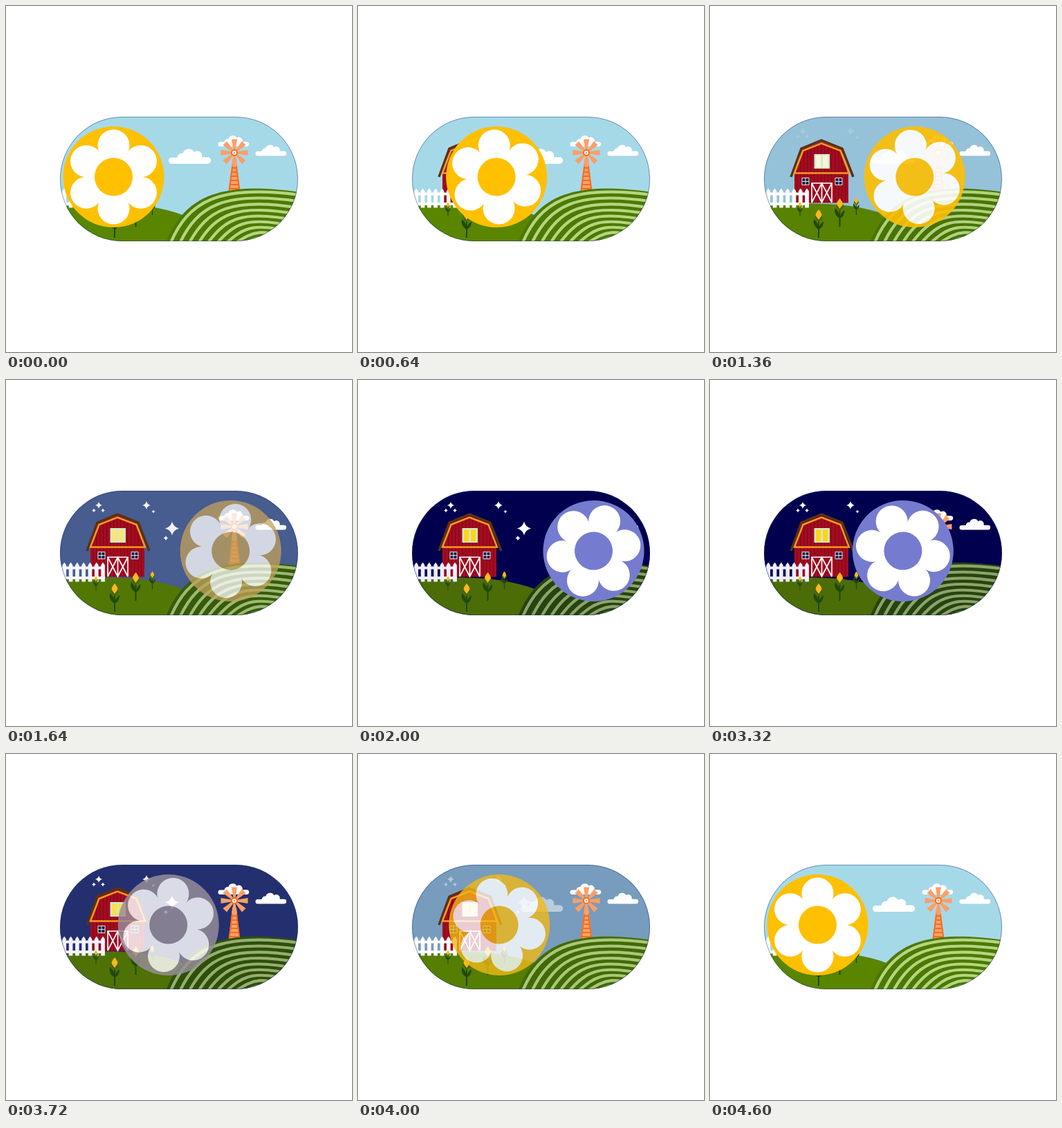
Animation of 500x500 px, one loop 4.96 s. Source, as an HTML page:

```html
<!DOCTYPE html>
<html lang="en">
<head>
<meta charset="utf-8">
<title>Day and night switch</title>
<style>
html, body { margin: 0; width: 100%; height: 100%; overflow: hidden; background: #fff; }
svg { display: block; width: 100vw; height: 100vh; }
</style>
</head>
<body>
<svg viewBox="0 0 500 500">
  <defs>
    <clipPath id="pill"><rect x="78" y="160" width="344" height="180" rx="90"/></clipPath>
    <pattern id="planks" width="5" height="10" patternUnits="userSpaceOnUse">
      <rect width="5" height="10" fill="#a80a20"/>
      <rect width="1.4" height="10" fill="#7d0c1c"/>
    </pattern>
    <path id="cloud" fill="#fff" d="M4.5 22a4.5 4.5 0 0 1 0-9h8a6.5 6.5 0 0 1 8-6a9 9 0 0 1 16.500-2a7 7 0 0 1 11 7.500h8.500a4.700 4.700 0 0 1 0 9.500z"/>
    <path id="star" fill="#fff" d="M0-10Q2-2 10 0Q2 2 0 10Q-2 2-10 0Q-2-2 0-10Z"/>
    <g id="corn">
      <path d="M0 0V-28" stroke="#1f4a0c" stroke-width="2"/>
      <path d="M0-12Q-9-17-7-27Q0-22 0-12M0-12Q7-15 7-24Q1-20 0-12" fill="#1f4a0c"/>
      <path d="M0-41Q9-31 0-25Q-9-31 0-41Z" fill="#fbb91b"/>
      <path d="M-5-33Q-7-26 0-23Q7-26 5-33L0-26Z" fill="#4d6510"/>
    </g>
    <g id="blossom">
      <circle r="40" fill="#fff"/>
      <g id="petals" fill="#fff"></g>
    </g>
  </defs>

  <g clip-path="url(#pill)">
    <rect id="sky" x="78" y="160" width="344" height="180"/>
    <g id="stars"></g>
    <use id="driftCloud" href="#cloud" x="235" y="206"/>
    <use href="#cloud" transform="translate(306.500 187) scale(.73)"/>
    <use href="#cloud" transform="translate(360.500 200.500) scale(.73)"/>

    <g fill="none" stroke="#f26d20" stroke-width="2">
      <path d="M327 222H333L338 267H322Z" fill="#ffa068" stroke="none"/>
      <path d="M327.500 229L322.500 267M332.500 229L337.500 267M327 234H333M326 240H334M325.500 246H335M325 252H335.500M324 258H336.500M323 264H337" />
    </g>
    <g transform="translate(330 212)">
      <g id="blades" fill="#ff9e66"></g>
      <circle r="4" fill="#fff" stroke="#f26d20" stroke-width="2"/>
      <circle r="1.500" fill="#ff9e66"/>
    </g>

    <path id="hill" d="M70 291C120 284 200 280 258 303V345H70Z"/>
    <path id="field" d="M231 342C256 280 302 251 424 269V345H231Z"/>
    <g id="rows" fill="none" stroke-width="4.200"></g>

    <g id="barn">
      <path d="M122 244L133 207L161 196L190 207L200 244V284.500H122Z" fill="url(#planks)"/>
      <path d="M117 247L132 206L161 194L191 206L207 247" fill="none" stroke="#5b3015" stroke-width="3.500" stroke-linejoin="round"/>
      <path d="M122 241.500L134.500 209L161 198.500L188.500 209L201 241.500Z" fill="none" stroke="#f49c1c" stroke-width="2.500"/>
      <rect x="150.500" y="214" width="22.500" height="21" fill="#cfe9cb"/>
      <path id="panes" d="M153 216H160.500V233H153ZM163 216H170.500V233H163Z"/>
      <g fill="#172147" stroke="#e8dfe4">
        <path d="M133 248.500H143V258.500H133ZM138 248.500V258.500M133 253.500H143"/>
        <path d="M181 248.500H191V258.500H181ZM186 248.500V258.500M181 253.500H191"/>
      </g>
      <path d="M147 284V256H176V284M161.500 256V284M147 256L161.500 284L176 256M147 284L161.500 256L176 284" fill="none" stroke="#fff" stroke-width="1.700"/>
    </g>
    <path id="fence"/>
    <use href="#corn" transform="translate(130 304) scale(.5)"/>
    <use href="#corn" transform="translate(211.500 302) scale(.62)"/>
    <use href="#corn" transform="translate(187.500 319)"/>
    <use href="#corn" transform="translate(157 335)"/>

    <g id="moon">
      <circle r="73" fill="#757ccf"/>
      <use href="#blossom"/>
      <circle r="27.500" fill="#757ccf"/>
    </g>
    <g id="sun">
      <circle r="73" fill="#ffc000"/>
      <use href="#blossom"/>
      <circle r="27.500" fill="#ffc000"/>
    </g>
  </g>
  <rect x="78.500" y="160.500" width="343" height="179" rx="89.500" fill="none" stroke="#16306f" stroke-opacity=".55" stroke-width=".8"/>
</svg>

<script>
const LOOP = 4960, STEP = 40, TRAVEL = 2000, RETURN_AT = 2600, FADE = 800;
const LEFT = 155.5, RIGHT = 340.5, TURN = 140;
const $ = id => document.getElementById(id);
const repeat = (count, make) => Array.from({ length: count }, (_, i) => make(i)).join('');
const clamp = v => Math.min(1, Math.max(0, v));
const smooth = v => v * v * (3 - 2 * v);

$('petals').innerHTML = repeat(6, i => `<circle cy="-45.5" r="23" transform="rotate(${i * 60})"/>`);
$('blades').innerHTML = repeat(8, i => `<path d="M-1.500-4L-4-19.500H4L1.500-4Z" transform="rotate(${i * 45})"/>`);
$('rows').innerHTML = repeat(9, i => {
  const x = 238 + 13.5 * i;
  return `<path d="M${x} 342C${x + 25} ${284 + 6 * i} ${305 + 9 * i} ${257 + 9 * i} 425 ${273 + 9.5 * i}"/>`;
});
$('fence').setAttribute('d', 'M78 269.500H143V273.500H78ZM78 284H143V288H78Z' +
  repeat(7, i => `M${81.5 + 9.3 * i} 291.500v-24l2.800-4l2.800 4v24z`));
$('stars').innerHTML = [
  [134, 181, .5], [127, 188.5, .3], [140, 188.5, .3], [203, 181, .6],
  [213, 190, .26], [240, 214.5, 1], [231, 228.5, .35]
].map(([x, y, s]) => `<use href="#star" transform="translate(${x} ${y}) scale(${s})"/>`).join('');

// Day and night colours
const palette = {
  sky: ['fill', [166, 217, 232], [0, 0, 78]],
  hill: ['fill', [89, 133, 0], [76, 108, 8]],
  field: ['fill', [76, 121, 4], [37, 68, 16]],
  rows: ['stroke', [181, 214, 126], [143, 163, 106]],
  fence: ['fill', [255, 255, 255], [238, 238, 255]],
  panes: ['fill', [244, 250, 240], [255, 213, 26]]
};

function bezier(x1, y1, x2, y2) {
  const at = (a, b, u) => 3 * (1 - u) ** 2 * u * a + 3 * (1 - u) * u * u * b + u ** 3;
  return x => {
    let low = 0, high = 1;
    for (let i = 0; i < 24; i++) {
      const mid = (low + high) / 2;
      if (at(x1, x2, mid) < x) low = mid; else high = mid;
    }
    return at(y1, y2, (low + high) / 2);
  };
}

const rollOut = bezier(.333, .39, .667, .92);
const slideBack = bezier(.167, 0, .833, 1);
const rollBack = bezier(.167, 0, .833, .85);

function render(time) {
  const out = clamp(time / TRAVEL), back = clamp((time - RETURN_AT) / TRAVEL);
  const returning = time >= RETURN_AT;
  const place = returning ? 1 - slideBack(back) : smooth(out);
  const roll = returning ? 1 - rollBack(back) : rollOut(out);
  const night = smooth(clamp((time - 1200) / FADE)) - smooth(clamp((time - 3480) / FADE));

  for (const [id, [attr, day, dark]] of Object.entries(palette)) {
    $(id).setAttribute(attr, `rgb(${day.map((c, i) => Math.round(c + (dark[i] - c) * night))})`);
  }
  $('stars').setAttribute('opacity', clamp(night * 1.6));
  $('driftCloud').setAttribute('opacity', clamp(1 - night * 1.8));

  const pose = `translate(${LEFT + (RIGHT - LEFT) * place} 247) rotate(${TURN * roll})`;
  for (const [id, opacity] of [['sun', 1 - night], ['moon', night]]) {
    $(id).setAttribute('transform', pose);
    $(id).setAttribute('opacity', opacity);
  }
}

const start = performance.now();
function tick() {
  render(Math.floor((performance.now() - start) % LOOP / STEP) * STEP);
  requestAnimationFrame(tick);
}
tick();
</script>
</body>
</html>
```
